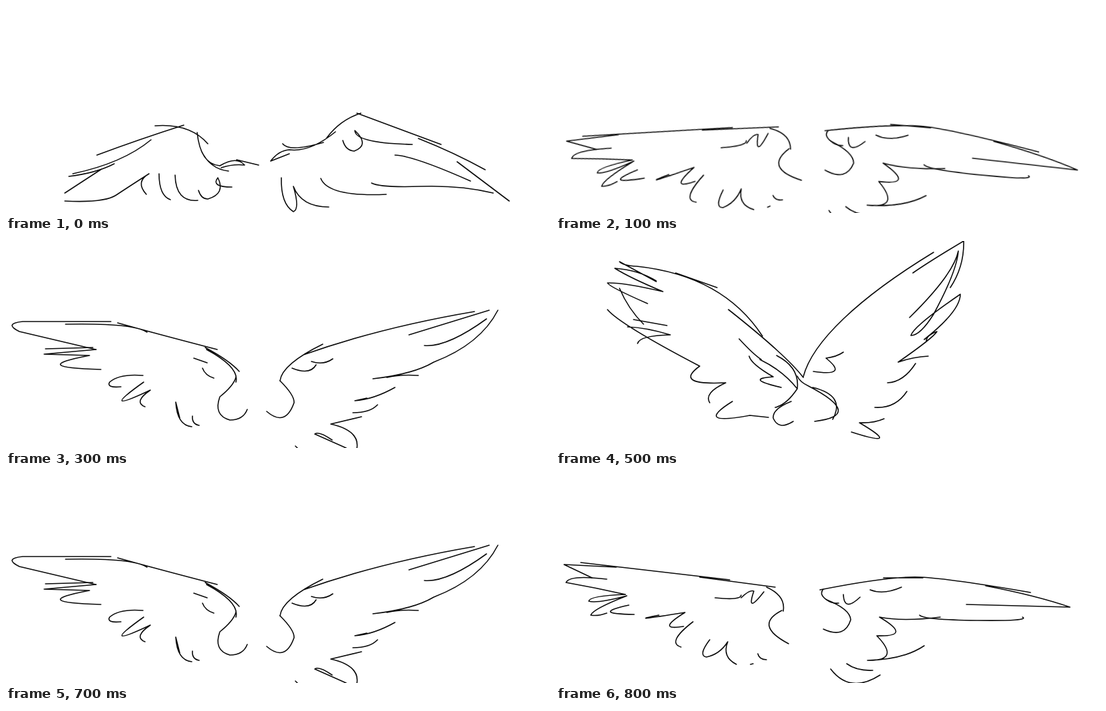
Write an HTML page without scripts that moves like this. It is 814 by 311 pixels and loops after 0.9 s.

```html
<!DOCTYPE html>
<html lang="en">
<head>
<meta charset="utf-8">
<title>Wing beat</title>
<style>
html, body { margin: 0; width: 100%; height: 100%; overflow: hidden; background: #fff; }
svg { display: block; width: 100%; height: 100%; }
path { fill: none; stroke: #0a0a0a; stroke-width: 1.6; stroke-linecap: round; stroke-linejoin: round; }

/* nine equal slots; --slot places a pose that shows once */
.pose { opacity: 0; animation: once .9s calc(var(--slot, 0) * .1s - .9s) step-end infinite; }
.level { animation-name: level; }
.raised { animation-name: raised; }
@keyframes once { 0% { opacity: 1 } 11.111%, 100% { opacity: 0 } }
@keyframes level {
  0% { opacity: 0 } 22.222% { opacity: 1 } 33.333% { opacity: 0 }
  88.888%, 100% { opacity: 1 }
}
@keyframes raised {
  0% { opacity: 0 } 33.333% { opacity: 1 } 55.555% { opacity: 0 }
  77.777% { opacity: 1 } 88.888%, 100% { opacity: 0 }
}
</style>
</head>
<body>
<svg viewBox="0 0 814 311">
  <g class="pose" style="--slot:0">
    <path d="M223 180Q275 176 302 207M136 224Q200 200 266 179M100 252Q175 236 217 201M94 256Q135 251 162 237M143 245L88 281"/>
    <path d="M88 293Q147 296 165 284T214 252Q193 264 210 283M229 252Q229 285 246 291M253 254Q254 295 287 292M288 277Q292 290 302 290Q329 282 317 258Q306 272 338 272"/>
    <path d="M286 190Q291 238 320 240Q345 225 357 239Q340 237 322 243M345 231L378 239M292 217Q305 245 333 248"/>
    <path d="M424 222L396 233Q408 217 424 216Q455 220 493 189M414 207Q424 220 475 205M480 198Q500 171 531 161M525 161L651 208M617 199Q670 220 717 246"/>
    <path d="M504 202Q508 217 521 218Q545 209 522 187Q522 206 608 208M582 224Q610 225 695 263M675 234L753 293M547 266Q560 273 620 271T729 281"/>
    <path d="M471 259Q482 287 569 283M412 258Q411 297 430 309Q440 305 430 271Q442 302 483 302"/>
  </g>

  <!-- between down and level: the level wings, tilted -->
  <g class="pose" style="--slot:1">
    <use href="#left" transform="translate(8 14) rotate(-10 330 185)"/>
    <use href="#right" transform="translate(-2 16) rotate(5 400 190) scale(1.02 1)"/>
  </g>

  <g class="pose level">
    <g id="left">
      <path d="M54 153L12 133L90 137M37 130L260 156M215 152L328 167M315 167Q344 180 340 203M338 202Q295 224 348 252"/>
      <path d="M76 155Q20 148 15 160Q60 168 104 178Q50 180 49 188Q60 192 106 180Q55 200 52 209Q62 211 76 206M109 194Q50 207 117 208M154 209Q100 220 193 205Q148 233 191 226"/>
      <path d="M205 219Q165 250 187 257M230 246Q212 270 225 272Q245 268 257 249Q248 272 270 283M291 283L295 282M302 267Q304 276 315 276M238 183Q277 187 277 179M277 183Q290 170 296 173Q284 209 311 174"/>
    </g>
    <g id="right">
      <path d="M395 171Q500 150 545 152T710 175M490 153H549M643 165Q720 180 769 197L614 193M400 170Q393 178 405 186Q440 200 441 216Q432 245 400 230"/>
      <path d="M405 186Q412 192 423 191M430 178Q431 205 455 182M470 171Q490 179 517 167M544 209Q550 216 630 217T698 212"/>
      <path d="M575 212Q520 219 484 212Q535 242 480 240Q517 278 466 277Q520 276 551 255M435 282Q450 293 474 292M411 290Q440 328 485 299"/>
    </g>
  </g>

  <g class="pose raised">
    <path d="M134 163L20 136Q-4 124 25 121H157M89 125Q190 123 211 137M167 123Q220 138 316 163M298 160Q335 180 349 196M300 163Q350 190 344 212"/>
    <path d="M59 162L130 160M135 163L57 170L125 172Q30 190 142 193M172 219Q150 221 155 212Q170 199 205 202M206 212Q136 262 216 224Q190 242 208 249"/>
    <path d="M260 266L254 242Q256 277 278 279M279 263Q278 275 289 277M281 176L301 183M294 191Q298 202 311 206M344 205Q340 218 320 234Q310 262 335 269Q355 269 361 253"/>
    <path d="M410 210Q413 185 474 155M445 171Q560 130 701 106M603 141L723 104M626 157Q660 160 719 117M736 104Q710 155 640 182Q610 200 549 207M570 205Q590 200 617 202"/>
    <path d="M428 191Q455 202 464 186M457 181Q475 187 489 177M410 210Q432 232 431 243Q418 280 390 256M582 220Q550 238 522 240L540 236"/>
    <path d="M519 258Q545 258 556 246M532 264L486 275Q530 285 525 312M488 299Q468 285 462 290L509 311M433 308L437 312"/>
  </g>

  <g class="pose" style="--slot:5">
    <path d="M150 61L95 31Q100 37 121 38Q250 52 309 143M179 48L241 70M150 60Q125 44 88 41Q110 55 160 76Q100 62 77 63Q80 69 137 94M95 71Q108 102 131 125"/>
    <path d="M77 103Q95 125 215 188Q175 217 254 213Q221 228 230 243M107 129Q135 130 171 141Q125 142 122 154M116 118L166 127M264 241Q205 278 290 262L318 265"/>
    <path d="M258 103Q345 172 370 205M274 147Q295 170 307 178M289 173Q292 185 325 204Q281 207 337 220M305 178Q340 195 361 222M330 172Q365 190 361 222Q345 246 328 250M352 241Q324 252 325 266Q333 285 355 271"/>
    <path d="M370 204Q380 165 430 117T565 17M534 48Q560 30 610 0Q611 38 590 70M529 115Q595 50 602 15Q600 45 565 110Q545 142 531 142Q535 128 605 80Q605 105 551 148"/>
    <path d="M554 150Q555 141 570 136Q565 145 512 182Q535 174 557 173M538 184Q520 212 496 213M525 226Q508 252 477 250M491 267Q475 274 454 273Q520 312 442 287"/>
    <path d="M430 167Q420 174 404 176Q439 204 385 196M361 203Q365 212 378 218Q462 262 387 271M384 220Q434 232 414 268"/>
  </g>

  <g class="pose" style="--slot:6">
    <path d="M92 108L27 52Q110 46 202 99M78 50L127 65M172 84L354 190M350 184Q388 209 330 238M342 233Q320 240 322 260Q333 277 357 262"/>
    <path d="M34 102Q40 98 95 109Q12 114 138 160Q-2 168 142 175Q31 202 173 179Q118 211 151 212M206 208Q126 232 192 208M209 220Q169 241 214 241"/>
    <path d="M228 249Q205 256 211 267M227 251Q215 300 241 252M256 264Q252 283 271 284M254 150L270 178L319 193Q260 211 334 210"/>
    <path d="M422 164Q560 75 665 14M478 122L555 76M615 49Q665 30 714 2Q702 78 595 132Q640 115 685 85L636 129M657 112Q662 130 641 153"/>
    <path d="M655 149Q610 190 570 213M586 212Q565 243 518 247M462 147Q385 200 383 215Q382 230 400 233Q448 254 395 261M482 171Q460 185 425 190Q465 208 413 204"/>
    <path d="M545 254Q510 268 494 264Q493 259 510 263Q525 268 512 279M505 292Q475 293 460 287L491 312M438 299Q448 309 462 312"/>
  </g>
</svg>
</body>
</html>
```
